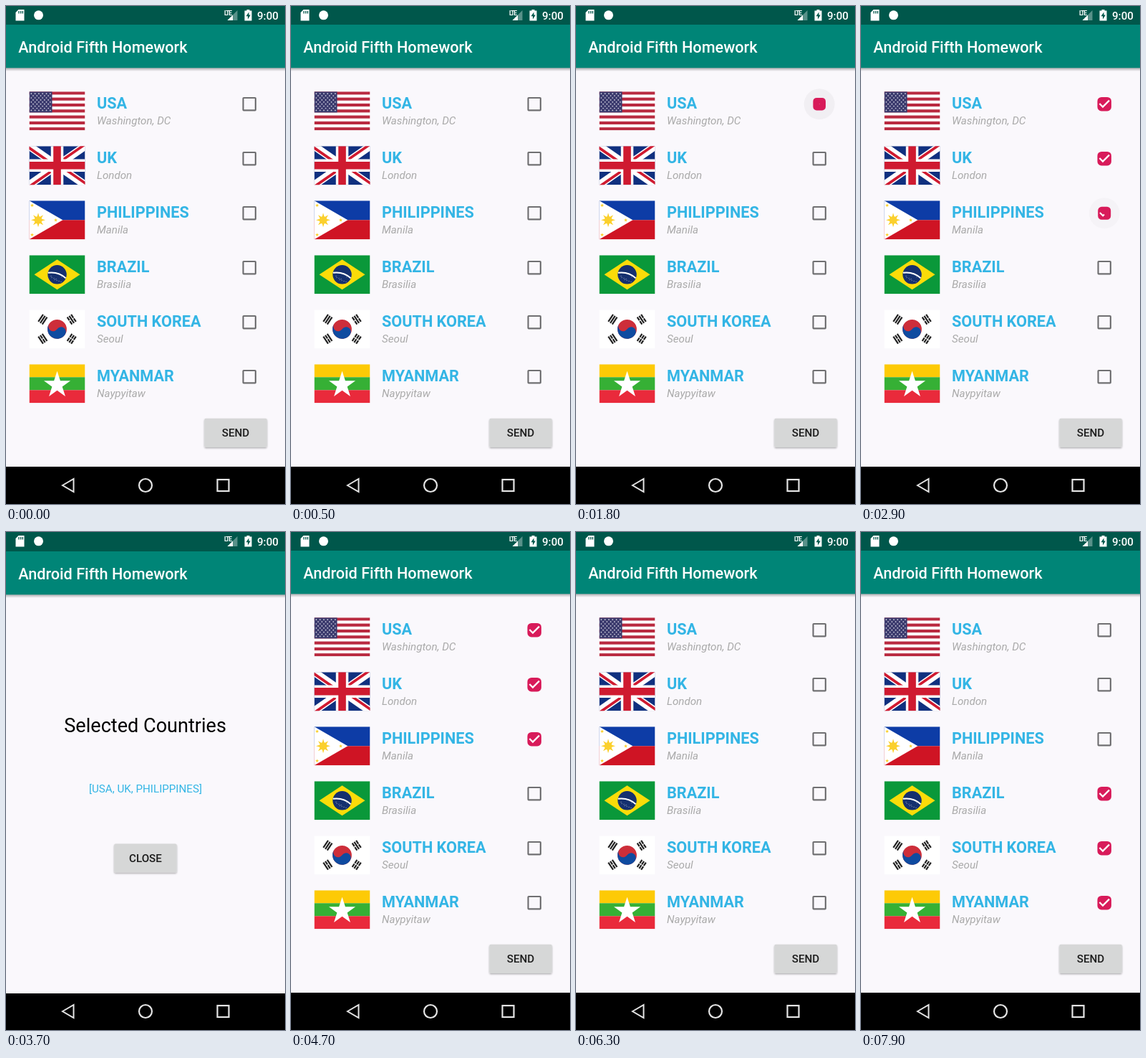
Recreate the animation shown at these times as an HTML page. Size 390x694 px, loop 8000 ms.

```html
<!DOCTYPE html>
<html lang="en">
<head>
<meta charset="utf-8">
<title>Country picker</title>
<style>
html, body { margin: 0; width: 100%; height: 100%; overflow: hidden; background: #000; }
svg { display: block; width: 390px; height: 694px; font-family: Roboto, sans-serif; }
.title { font-size: 21.67px; font-weight: 500; fill: #fff; }
.name { font-size: 21.67px; font-weight: 700; fill: #33b5e5; }
.city { font-size: 15.17px; font-style: italic; fill: #aaa; }
.label { font-size: 15.17px; font-weight: 500; fill: #1b1b1b; text-anchor: middle; }
.heading { font-size: 27.08px; text-anchor: middle; }
.picked { font-size: 15.17px; fill: #33b5e5; text-anchor: middle; }
.clock { font-size: 15.17px; font-weight: 500; fill: #fff; }
.lte { font-size: 8.5px; font-weight: 700; fill: #fff; letter-spacing: -1.4px; }
</style>
</head>
<body>
<svg id="stage" viewBox="0 0 390 694"></svg>
<script>
const rect = (x, y, w, h, fill, extra = '') =>
  `<rect x="${x}" y="${y}" width="${w}" height="${h}" fill="${fill}" ${extra}/>`;
const circle = (x, y, r, fill, extra = '') =>
  `<circle cx="${x}" cy="${y}" r="${r}" fill="${fill}" ${extra}/>`;
const path = (d, fill, extra = '') => `<path d="${d}" fill="${fill}" ${extra}/>`;
const line = (d, color, width) => path(d, 'none', `stroke="${color}" stroke-width="${width}"`);
const text = (cls, x, y, s) => `<text class="${cls}" x="${x}" y="${y}">${s}</text>`;
const range = (n, fn) => Array.from({ length: n }, (_, i) => fn(i)).join('');

function star(x, y, points, outer, inner, fill) {
  const d = range(points * 2, i => {
    const a = i * Math.PI / points - Math.PI / 2, r = i % 2 ? inner : outer;
    return `${i ? 'L' : 'M'}${(x + r * Math.cos(a)).toFixed(2)} ${(y + r * Math.sin(a)).toFixed(2)}`;
  });
  return path(d + 'Z', fill);
}

// Flags fill a 78 x 54 box.
function usa() {
  const stripe = 54 / 13;
  return rect(0, 0, 78, 54, '#fff') +
    range(7, i => rect(0, i * 2 * stripe, 78, stripe, '#b92a40')) +
    rect(0, 0, 32, stripe * 7, '#3c3b6e') +
    range(9, row => range(6 - row % 2, col =>
      circle(2.8 + (row % 2) * 2.65 + col * 5.3, 2.9 + row * 2.9, 0.85, '#d5d5e2')));
}

function uk() {
  return rect(0, 0, 78, 54, '#10307f') +
    line('M0 0L78 54M78 0L0 54', '#fff', 10.8) +
    line('M-1 1.8L38 28.8M79 52.2L40 25.2M77 -1.8L38 25.2M1 55.8L40 28.8', '#cf1a30', 3.6) +
    line('M39 0V54M0 27H78', '#fff', 17.5) +
    line('M39 0V54M0 27H78', '#cf1a30', 10.6);
}

function philippines() {
  const sun = '#fbd02c';
  return rect(0, 0, 78, 27, '#0d3ca6') + rect(0, 27, 78, 27, '#cf1424') +
    path('M0 0L46.8 27L0 54Z', '#fff') +
    star(12.5, 27, 8, 10, 4.5, sun) + circle(12.5, 27, 5.2, sun) +
    star(4, 6.5, 5, 2.6, 1.1, sun) + star(4, 47.5, 5, 2.6, 1.1, sun) + star(37, 27, 5, 2.6, 1.1, sun);
}

function brazil() {
  return rect(0, 0, 78, 54, '#0a983a') +
    path('M7 27L39 6L71 27L39 48Z', '#fbdc09') +
    circle(39, 27, 13.2, '#15306f') +
    line('M26.2 24.5Q41 22.5 51 32', '#fff', 2) +
    range(9, i => circle(30.5 + i * 7 % 17, 29 + i * 4 % 9, 0.5, '#cdd5e6'));
}

function southKorea() {
  const bars = (x, y, angle, broken) =>
    `<g transform="translate(${x} ${y}) rotate(${angle})">` + [-3.3, 0, 3.3].map((dy, i) =>
      line(broken[i] ? `M-6 ${dy}H-.5M.5 ${dy}H6` : `M-6 ${dy}H6`, '#222', 2.2)).join('') + '</g>';
  return rect(0, 0, 78, 54, '#fff') +
    `<g transform="translate(39 27) rotate(33.7)">` + circle(0, 0, 13.4, '#cd2e3a') +
    path('M-13.4 0A6.7 6.7 0 0 0 0 0A6.7 6.7 0 0 1 13.4 0A13.4 13.4 0 0 1 -13.4 0Z', '#0f4ba0') + '</g>' +
    bars(18.8, 13.5, -56, [0, 0, 0]) + bars(59.2, 13.5, 56, [1, 0, 1]) +
    bars(18.8, 40.5, 56, [0, 1, 0]) + bars(59.2, 40.5, -56, [1, 1, 1]);
}

function myanmar() {
  return rect(0, 0, 78, 18, '#fdca06') + rect(0, 18, 78, 18, '#36b035') +
    rect(0, 36, 78, 18, '#e92a3b') + star(39, 29, 5, 19.5, 7.5, '#fff');
}

// Each country: name, capital, flag, times at which its box is tapped.
const countries = [
  ['USA', 'Washington, DC', usa, [1650, 5000]],
  ['UK', 'London', uk, [2150, 5450]],
  ['PHILIPPINES', 'Manila', philippines, [2650, 5900]],
  ['BRAZIL', 'Brasilia', brazil, [6560]],
  ['SOUTH KOREA', 'Seoul', southKorea, [7050]],
  ['MYANMAR', 'Naypyitaw', myanmar, [7550]],
];

const row = ([name, city, flag], i) => `<g transform="translate(0 ${i * 76})">
  <svg x="32.5" y="119.3" width="78" height="54" viewBox="0 0 78 54">${flag()}</svg>
  ${text('name', 127, 142.7, name)}${text('city', 127, 165, city)}
  <g transform="translate(340.2 136.7)">
    <circle class="ripple" opacity="0"/>
    <g class="box"><rect rx="0.8" fill="none"/>
      <path class="tick" d="M-6.8 -.8L-2.2 3.9L6.8 -5.1" fill="none" stroke="#fff"
        stroke-width="2.2" pathLength="1" stroke-dasharray="1 2"/></g>
  </g></g>`;

const button = (id, x, y, label) =>
  rect(x, y, 87.5, 40, '#d6d7d7', 'rx="2" filter="url(#shadow)"') +
  rect(x, y, 87.5, 40, '#000', `rx="2" id="${id}" opacity="0"`) +
  text('label', x + 43.75, y + 25.5, label);

const screen = (id, content) => `<g id="${id}">` +
  rect(0, 0, 390, 642, '#faf8fc') + rect(0, 86, 390, 5, 'url(#edge)') +
  rect(0, 0, 390, 26, '#00574b') + rect(0, 26, 390, 60.3, '#008577') +
  rect(0, 642, 390, 52, '#000') +
  text('title', 17.3, 64.8, 'Android Fifth Homework') + content + '</g>';

const systemIcons =
  path('M17.5 5H25.5V20.5H13.5V9Z', '#fff') + line('M18 7V10.5M20.7 7V10.5M23.3 7V10.5', '#00574b', 1.3) +
  circle(45.5, 12.8, 6.5, '#fff') +
  text('lte', 305, 12.8, 'LTE') +
  path('M323.5 6V20H309.5Z', '#fff', 'opacity=".35"') + path('M317 12.5V20H309.5Z', '#fff') +
  path('M336.5 5H340.5V6.5H343.5V20.5H333.5V6.5H336.5Z', '#fff') +
  path('M339.5 8.5L335.5 14.3H338V18.5L341.8 12.5H339.5Z', '#00574b') +
  text('clock', 351, 18.6, '9:00') +
  line('M79 668L94.5 659V677Z', '#e4e4e4', 2) +
  circle(195, 668, 9, 'none', 'stroke="#e4e4e4" stroke-width="2.2"') +
  rect(295.5, 660, 16, 16, 'none', 'stroke="#e4e4e4" stroke-width="2.2"');

const stage = document.getElementById('stage');
stage.innerHTML = `<defs>
  <linearGradient id="edge" x2="0" y2="1"><stop stop-color="#000" stop-opacity=".32"/>
    <stop offset="1" stop-color="#000" stop-opacity="0"/></linearGradient>
  <filter id="shadow" x="-10%" y="-20%" width="120%" height="150%">
    <feDropShadow dx="0" dy="1.4" stdDeviation="1.3" flood-opacity=".33"/></filter></defs>` +
  screen('list', countries.map(row).join('') + button('send', 277.3, 574.8, 'SEND')) +
  screen('result', text('heading', 194.6, 278, 'Selected Countries') +
    text('picked', 195, 362.4, '[USA, UK, PHILIPPINES]') + button('close', 151.2, 433.6, 'CLOSE')) +
  systemIcons;

const find = id => document.getElementById(id);
const set = (el, attrs) => { for (const key in attrs) el.setAttribute(key, attrs[key]); };
const clamp = v => Math.max(0, Math.min(1, v));
const mix = (a, b, k) => a + (b - a) * k;

const result = find('result'), send = find('send'), close = find('close');
const boxes = [...stage.querySelectorAll('.box')].map((box, i) => ({
  box, frame: box.firstElementChild, tick: box.querySelector('.tick'),
  ripple: box.previousElementSibling, taps: countries[i][3],
}));

const LOOP = 8000, TOGGLE = 350, FILLED = 0.45;

function drawBox({ box, frame, tick, ripple, taps }, t) {
  const past = taps.filter(tap => tap <= t);
  const age = past.length ? t - past[past.length - 1] : Infinity;
  const progress = past.length ? clamp(age / TOGGLE) : 0;
  const k = past.length === 2 ? 1 - progress : progress;
  const fill = clamp(k / FILLED), width = mix(2.17, 9.75, fill);
  const color = [[112, 216], [112, 27], [114, 90]].map(([a, b]) => Math.round(mix(a, b, clamp(fill * 2))));
  set(box, { transform: `scale(${1 - 0.1 * Math.sin(Math.PI * k)})` });
  set(frame, {
    x: width / 2 - 9.75, y: width / 2 - 9.75, width: 19.5 - width, height: 19.5 - width,
    stroke: `rgb(${color})`, 'stroke-width': width,
  });
  const drawn = clamp((k - FILLED) / (1 - FILLED));
  set(tick, { 'stroke-dashoffset': 1 - drawn, opacity: drawn > 0 ? 1 : 0 });
  set(ripple, {
    r: 21.5 * (1 - (1 - clamp(age / 150)) ** 2),
    opacity: 0.035 * clamp((TOGGLE - age) / 180),
  });
}

function render() {
  const t = performance.now() % LOOP;
  boxes.forEach(b => drawBox(b, t));
  set(send, { opacity: t < 3700 ? 0.1 * clamp((t - 3250) / 150) : 0 });
  set(close, { opacity: 0.1 * clamp((t - 4050) / 150) });

  // The second screen settles upward, then fades while sliding down.
  const leave = clamp((t - 4300) / 220);
  const shift = t < 3790 ? 1 : 51 * leave * leave;
  set(result, {
    transform: `translate(0 ${shift})`,
    opacity: 1 - leave,
    visibility: t >= 3690 && leave < 1 ? 'visible' : 'hidden',
  });
  requestAnimationFrame(render);
}
render();
</script>
</body>
</html>
```
